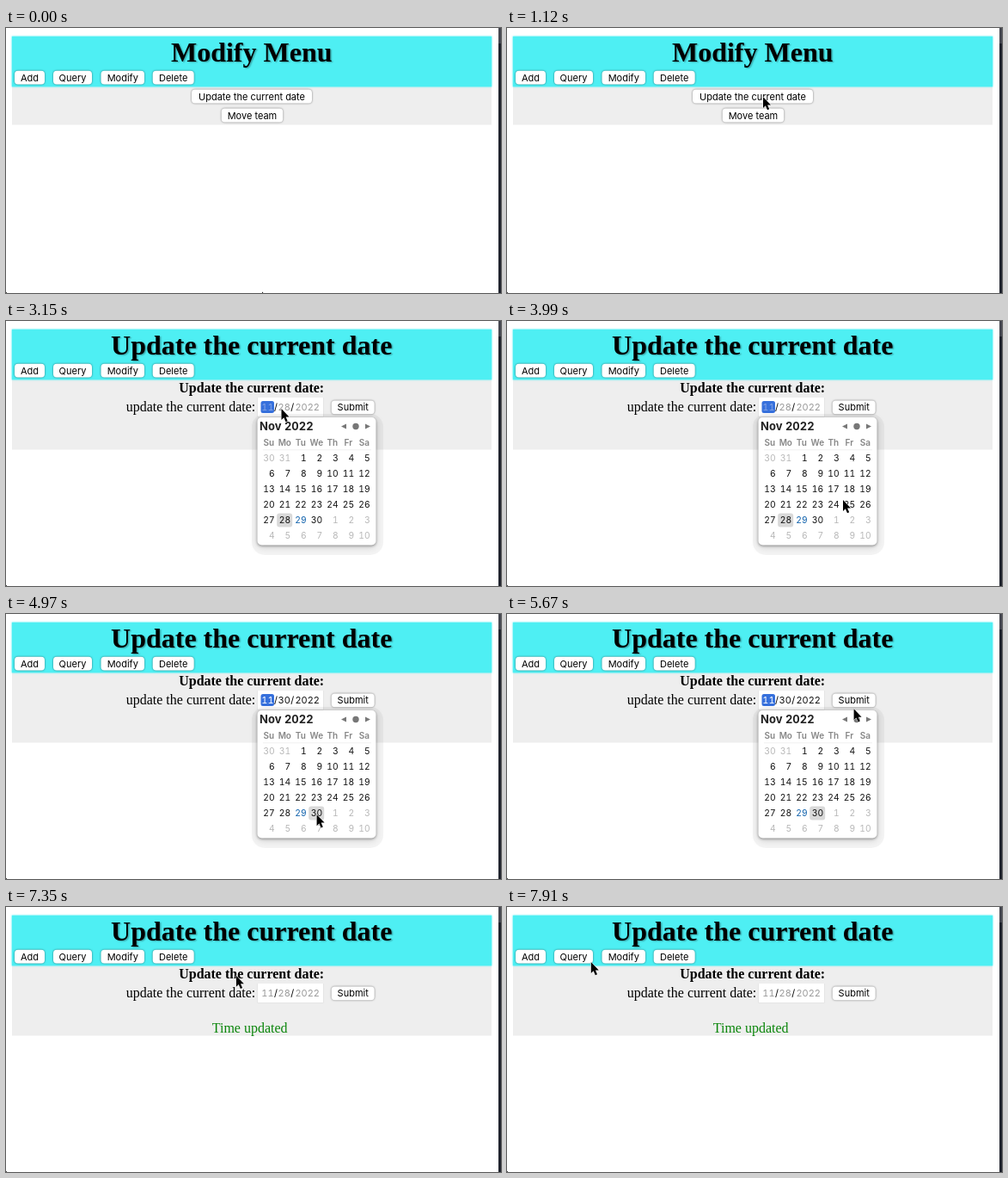
Animation of 576x308 px, one loop 8000 ms. Source, as an HTML page:

```html
<!DOCTYPE html>
<html lang="en">
<head>
<meta charset="utf-8">
<title>Update the current date</title>
<style>
html, body { margin: 0; width: 100%; height: 100%; overflow: hidden; background: #fff; }
svg { display: block; }
text { font: 11px Inter, "Open Sans", sans-serif; text-anchor: middle; }
.serif { font: 16px "Liberation Serif", Times, serif; }
.bold { font-weight: bold; }
.title { font: bold 32px "Liberation Serif", Times, serif; text-shadow: 1.5px 1.5px 1.5px rgba(0,0,0,.3); }
.band { filter: drop-shadow(0 0 .8px rgba(78,239,243,.7)); }
.btn rect { fill: #fff; filter: drop-shadow(0 .5px .8px rgba(0,0,0,.5)); }
.btn.down rect { fill: #ececec; }
.date text { font-variant-numeric: tabular-nums; }
.cal text { font-size: 10.3px; font-variant-numeric: tabular-nums; }
.cal .day { text-anchor: end; }
.cal .week { font-size: 10px; font-weight: 600; fill: #858585; }
.cal .month { font-size: 13px; font-weight: 700; text-anchor: start; fill: #222; }
.cal .frame { fill: #fff; filter: drop-shadow(0 1px 1.5px rgba(0,0,0,.4)) drop-shadow(0 2px 4px rgba(0,0,0,.15)); }
</style>
</head>
<body>
<svg id="stage" width="576" height="308" viewBox="0 0 576 308"></svg>
<script>
const LOOP = 8000, STEP = 70;
const PRESS_MENU = 1400, OPEN_FORM = 1960, OPEN_CAL = 3150, PICK = 4970, SUBMIT = 6090, DONE = 6370;

// Pointer path: time, x, y
const path = [
  [0, 298, 306.5], [70, 306, 250], [140, 308, 180], [210, 284, 128], [280, 284, 128],
  [1120, 298, 80], [2450, 298, 80], [3010, 318, 100], [3290, 323, 104],
  [3990, 391, 208], [4060, 391, 208], [4340, 405, 216], [4550, 345, 235],
  [4690, 358, 234], [4900, 358, 234], [5250, 376, 230], [5320, 376, 230],
  [5670, 403.6, 110.3], [5950, 409.8, 99.5], [6930, 409.8, 99.5], [7770, 126, 60], [7910, 97.8, 64]
];

const stage = document.getElementById('stage');
const rect = (x, y, w, h, fill, r = 0) =>
  `<rect x="${x}" y="${y}" width="${w}" height="${h}" rx="${r}" fill="${fill}"/>`;
const text = (s, x, y, cls = '', fill = '#000') =>
  `<text x="${x}" y="${y}" class="${cls}" fill="${fill}">${s}</text>`;
const button = (s, x, y, w, down) =>
  `<g class="btn${down ? ' down' : ''}">${rect(x, y, w, 15.8, '#fff', 4)}${text(s, x + w / 2, y + 11.9)}</g>`;

function calendar(picked) {
  let out = rect(286, 108, 153, 164, 'rgba(0,0,0,.045)', 15) +
    '<rect class="frame" x="292.5" y="112" width="138" height="148.5" rx="5"/>' +
    text('Nov 2022', 295, 126.8, 'month') +
    '<g fill="#777"><path d="M390 122.5l6-3v6zM424 122.5l-6-3v6z"/><circle cx="407" cy="122.5" r="3.7"/></g>' +
    rect(299, 149.5, 126, .7, '#eaeaea');
  ['Su', 'Mo', 'Tu', 'We', 'Th', 'Fr', 'Sa'].forEach((d, i) => {
    out += text(d, 305.8 + 18.5 * i, 145, 'week');
  });
  for (let i = 0; i < 42; i++) {
    const n = i - 1, x = 312.7 + 18.5 * (i % 7), y = 163.1 + 18 * Math.floor(i / 7);
    const inMonth = n >= 1 && n <= 30;
    const label = n < 1 ? n + 31 : n > 30 ? n - 30 : n;
    if (n === picked) out += rect(x - 16, y - 11.6, 18, 16, '#d9d9d9', 3);
    out += text(label, x, y, 'day', !inMonth ? '#b8b8b8' : n === 29 ? '#1263ad' : '#111');
  }
  return `<g class="cal">${out}</g>`;
}

function dateField(t) {
  const changed = t >= PICK && t < DONE, open = t >= OPEN_CAL && t < SUBMIT;
  const ink = changed ? '#111' : '#999', y = 104.1;
  return '<g class="date">' + rect(292.5, 89, 77, 22.5, '#dcdcdc') + rect(293, 89, 76, 22, '#fff') +
    (open ? rect(296.5, 93, 15.5, 14, '#3670dc', 2.5) : '') +
    text('11', 304.5, y, '', open ? (changed ? '#fff' : '#86a5e6') : ink) +
    text('/', 314, y) + text(changed ? '30' : '28', 323.7, y, '', ink) +
    text('/', 333.3, y) + text('2022', 350.7, y, '', ink) + '</g>';
}

function form(t) {
  return text('Update the current date:', 285.7, 83, 'serif bold') +
    text('update the current date:', 215, 105, 'serif') + dateField(t) +
    button('Submit', 378.7, 92.5, 50, t >= SUBMIT && t < DONE) +
    (t >= DONE ? text('Time updated', 283.7, 146, 'serif', '#0a850a') : '') +
    (t >= OPEN_CAL && t < SUBMIT ? calendar(t < PICK ? 28 : 30) : '');
}

const menu = t =>
  button('Update the current date', 216, 71.6, 140, t >= PRESS_MENU && t < PRESS_MENU + 140) +
  button('Move team', 250.7, 93.6, 71.5);

function pointer(t) {
  let i = path.findIndex(p => p[0] > t);
  if (i < 0) i = path.length;
  const a = path[i - 1], b = path[i] || a;
  const k = b === a ? 0 : (t - a[0]) / (b[0] - a[0]);
  const x = a[1] + (b[1] - a[1]) * k, y = a[2] + (b[2] - a[2]) * k;
  const beam = t >= OPEN_FORM && t < OPEN_CAL && y < 86;
  const shape = beam
    ? '<path d="M-3.5-8.5Q0-8.5 0-6.5Q0-8.5 3.5-8.5M0-7V4M-3.5 5.5Q0 5.5 0 3.5Q0 5.5 3.5 5.5M-2 0H2" fill="none" stroke="#111"/>'
    : '<path d="M0 0V13L2.8 10.3L5 15.2L7.2 14.2L5.1 9.4H9Z" fill="#000" stroke="#fff" paint-order="stroke"/>';
  return `<g transform="translate(${x} ${y})">${shape}</g>`;
}

function draw(now) {
  const t = Math.floor(now % LOOP / STEP) * STEP;
  const onForm = t >= OPEN_FORM;
  stage.innerHTML =
    rect(7, 68, 558, onForm ? 81.5 : 44.5, '#eee') +
    `<g class="band">${rect(6.8, 9.7, 558.4, 58.6, '#4eeff3')}</g>` +
    rect(573, 0, 3, 308, '#20232d') + rect(573, 0, 3, 18, '#454750') +
    rect(0, 307, 1, 1, '#444') +
    text(onForm ? 'Update the current date' : 'Modify Menu', 285.7, 38.7, 'title') +
    button('Add', 10, 49.7, 35) + button('Query', 55, 49.7, 45) +
    button('Modify', 110.5, 49.7, 50.5) + button('Delete', 170.7, 49.7, 48) +
    (onForm ? form(t) : menu(t)) + pointer(t);
}

const start = performance.now();
function tick() {
  draw(performance.now() - start);
  requestAnimationFrame(tick);
}
tick();
</script>
</body>
</html>
```
